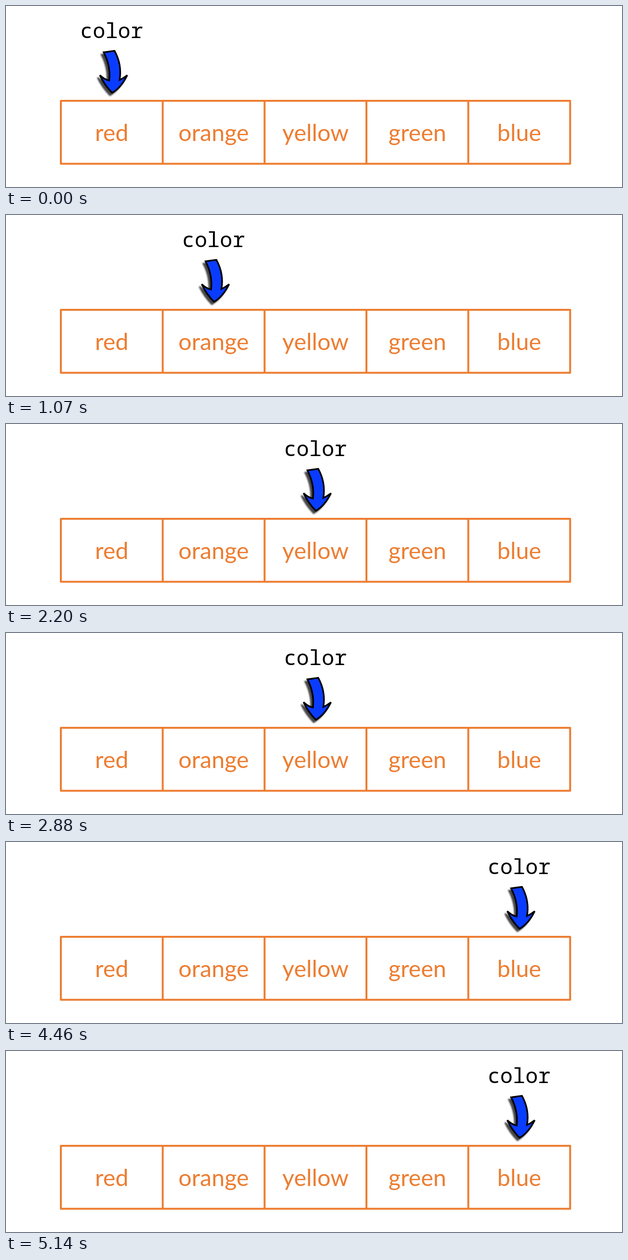
An HTML page for the animation above (5590 ms loop, 1280x378 px).

```html
<!DOCTYPE html>
<html lang="en">
<head>
<meta charset="utf-8">
<title>Loop over a list</title>
<style>
  html, body { margin: 0; width: 100%; height: 100%; overflow: hidden; background: #fff; }
  svg { display: block; width: 100%; height: 100%; }
  .grid { fill: none; stroke: #ed7d31; stroke-width: 4; stroke-linejoin: round; }
  .item { font: 48.5px Lato, Carlito, sans-serif; fill: #ed7d31; text-anchor: middle; }
  .name { font: 43.6px "Noto Sans Mono", monospace; fill: #000; text-anchor: middle; }
  .arrow { fill: #0a3cff; stroke: #000; stroke-width: 3.4; stroke-linejoin: miter; }
  .shadow { fill: #000; stroke: #000; stroke-width: 3.4; opacity: .72; }
</style>
</head>
<body>
<svg viewBox="0 0 1280 378">
  <defs>
    <path id="shape" d="M203 96.8L225.5 93.5Q241.5 123 236 154.5Q244 151 252 144.5Q239 171 220.5 181.2Q204.500 165 195 144.500Q205 154 214.500 155.500Q218 126 203 96.800Z"/>
    <filter id="blur" x="-30%" y="-30%" width="160%" height="160%">
      <feGaussianBlur stdDeviation="1.8"/>
    </filter>
  </defs>
  <path id="grid" class="grid"/>
  <g id="items"></g>
  <g id="pointer">
    <text class="name" x="219.500" y="67">color</text>
    <use href="#shape" class="shadow" transform="translate(-4.500 5)" filter="url(#blur)"/>
    <use href="#shape" class="arrow"/>
  </g>
</svg>
<script>
  const words = ["red", "orange", "yellow", "green", "blue"];
  const left = 114, top_ = 198, height = 131.5, cell = 211.65;
  const first = 1070, hold = 1130;
  const loop = first + hold * (words.length - 1);
  const byId = id => document.getElementById(id);

  let d = `M${left} ${top_}h${cell * words.length}v${height}H${left}Z`;
  words.forEach((word, i) => {
    if (i) d += `M${left + i * cell} ${top_}v${height}`;
    const label = document.createElementNS("http://www.w3.org/2000/svg", "text");
    label.setAttribute("class", "item");
    label.setAttribute("x", left + (i + 0.5) * cell);
    label.setAttribute("y", 282);
    label.textContent = word;
    byId("items").append(label);
  });
  byId("grid").setAttribute("d", d);

  function draw(time) {
    const t = time % loop;
    const index = t < first ? 0 : 1 + Math.floor((t - first) / hold);
    byId("pointer").setAttribute("transform", `translate(${index * cell} 0)`);
  }

  const start = performance.now();
  function tick() {
    draw(performance.now() - start);
    requestAnimationFrame(tick);
  }
  draw(0);
  requestAnimationFrame(tick);
</script>
</body>
</html>
```
